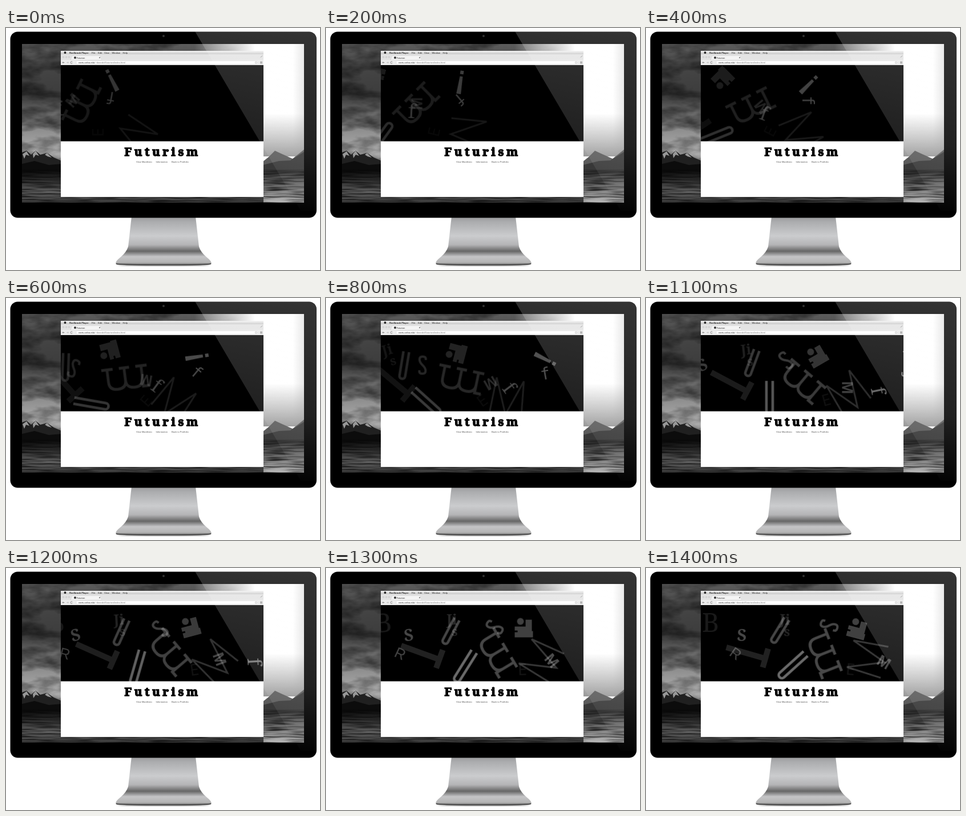
These frames come from a looping animation (550x424 px, 1.5 s). An HTML page:

```html
<!DOCTYPE html>
<html lang="en">
<head>
<meta charset="utf-8">
<title>Futurism</title>
<style>
  html, body { margin: 0; width: 100%; height: 100%; overflow: hidden; background: #fff; }
  svg { display: block; width: 100vw; height: 100vh; }
  text { font-family: "Liberation Sans", sans-serif; }
  .ui { font-size: 4.1px; }
  .title { font: 900 20.5px "Noto Serif", serif; letter-spacing: 4.6px; stroke: #000; stroke-width: 1.4; }
  .serif { font-family: "Noto Serif", serif; }
  .mono { font-family: "DejaVu Sans Mono", monospace; }
  .letters { animation: reveal 1.5s steps(8) infinite; animation-timing-function: linear; }
  .letters > g { fill: #fff; stroke: none; text-anchor: middle; animation: drift 1.5s steps(15) infinite; }
  .letters > .line { fill: none; stroke: #fff; }
  @keyframes drift {
    from { transform: var(--from); }
    to { transform: var(--to); }
  }
  /* one keyframe per third of the loop, held in 100 ms steps */
  @keyframes reveal {
    from { opacity: .35; animation-timing-function: steps(8); }
    53.333% { opacity: .55; animation-timing-function: steps(5); }
    86.667%, to { opacity: 1; }
  }
</style>
</head>
<body>
<svg viewBox="0 0 550 424" preserveAspectRatio="none">
  <defs>
    <linearGradient id="sky" x2="0" y2="1">
      <stop offset="0" stop-color="#5c5c5c"/>
      <stop offset=".2" stop-color="#444"/>
      <stop offset=".42" stop-color="#3c3c3c"/>
      <stop offset=".6" stop-color="#808080"/>
      <stop offset=".8" stop-color="#a4a4a4"/>
      <stop offset="1" stop-color="#b8b8b8"/>
    </linearGradient>
    <linearGradient id="glow">
      <stop offset="0" stop-color="#fff" stop-opacity="0"/>
      <stop offset=".55" stop-color="#fff"/>
      <stop offset=".9" stop-color="#fff"/>
      <stop offset="1" stop-color="#e4e4e4"/>
    </linearGradient>
    <linearGradient id="haze" x2="0" y2="1">
      <stop offset="0" stop-color="#999" stop-opacity="0"/>
      <stop offset="1" stop-color="#999"/>
    </linearGradient>
    <linearGradient id="water" x2="0" y2="1">
      <stop offset="0" stop-color="#080808"/>
      <stop offset=".3" stop-color="#2a2a2a"/>
      <stop offset=".7" stop-color="#606060"/>
      <stop offset="1" stop-color="#383838"/>
    </linearGradient>
    <linearGradient id="shine" x2="0" y2="1">
      <stop offset="0" stop-color="#2c2c2c"/>
      <stop offset=".5" stop-color="#777"/>
      <stop offset="1" stop-color="#b8b8b8"/>
    </linearGradient>
    <linearGradient id="metal" x2="0" y2="1">
      <stop offset="0" stop-color="#999a9c"/>
      <stop offset=".12" stop-color="#acadaf"/>
      <stop offset=".4" stop-color="#cbccce"/>
      <stop offset=".58" stop-color="#b4b4b6"/>
      <stop offset=".71" stop-color="#666"/>
      <stop offset=".82" stop-color="#c4c4c6"/>
      <stop offset=".94" stop-color="#b4b4b4"/>
      <stop offset="1" stop-color="#555"/>
    </linearGradient>
    <linearGradient id="gloss" x1=".8" y1="0" x2=".65" y2="1">
      <stop offset="0" stop-color="#fff" stop-opacity=".2"/>
      <stop offset=".6" stop-color="#fff" stop-opacity=".13"/>
      <stop offset="1" stop-color="#fff" stop-opacity="0"/>
    </linearGradient>
    <linearGradient id="bar" x2="0" y2="1">
      <stop offset="0" stop-color="#f4f4f4"/>
      <stop offset="1" stop-color="#c4c4c4"/>
    </linearGradient>
    <filter id="clouds" x="0" y="0" width="1" height="1">
      <feTurbulence type="fractalNoise" baseFrequency=".016 .04" numOctaves="4" seed="8"/>
      <feColorMatrix values="0 0 0 0 0  0 0 0 0 0  0 0 0 0 0  2.6 0 0 0 -.95"/>
    </filter>
    <filter id="ripples" x="0" y="0" width="1" height="1">
      <feTurbulence type="fractalNoise" baseFrequency=".02 .4" numOctaves="2" seed="3"/>
      <feColorMatrix values="0 0 0 0 0  0 0 0 0 0  0 0 0 0 0  2.4 0 0 0 -.9"/>
    </filter>
    <filter id="soft"><feGaussianBlur stdDeviation="1"/></filter>
    <clipPath id="screen"><rect x="28" y="28" width="494" height="278"/></clipPath>
    <clipPath id="hero"><rect x="96" y="65" width="355" height="133.500"/></clipPath>
    <clipPath id="case"><rect x="7.500" y="6.500" width="536.500" height="326" rx="13"/></clipPath>
  </defs>

  <rect width="550" height="424" fill="#fff"/>

  <!-- stand -->
  <ellipse cx="276" cy="415.500" rx="80" ry="1.800" fill="#999" filter="url(#soft)"/>
  <path fill="url(#metal)" d="M220 330H332L338 383Q341 393 352 402Q362 410 359 414Q354 416 276 416Q198 416 193 414Q190 410 200 402Q211 393 214 383Z"/>
  <path d="M193 413Q199 415 276 415Q353 415 359 413" fill="none" stroke="#444" stroke-width="1.4"/>

  <!-- display -->
  <rect x="7.500" y="6.500" width="536.500" height="326" rx="13" fill="#000"/>
  <circle cx="276" cy="14" r="2" fill="#333"/>

  <!-- wallpaper -->
  <g clip-path="url(#screen)">
    <rect x="28" y="28" width="494" height="222" fill="url(#sky)"/>
    <rect x="28" y="28" width="494" height="222" filter="url(#clouds)" opacity=".55"/>
    <rect x="330" y="28" width="192" height="222" fill="url(#glow)"/>
    <rect x="451" y="150" width="71" height="75" fill="url(#haze)"/>
    <path d="M28 218L36 215L44 222L52 215L60 222L72 219L84 227L98 233V252H28Z" fill="#202020"/>
    <path d="M29 221L36 216L41 224L35 222L32 229ZM47 221L52 215L58 224L52 222L48 228ZM68 222L72 219L80 227L73 225Z" fill="#999"/>
    <path d="M28 238L50 233L75 240L98 238V252H28Z" fill="#0c0c0c"/>
    <path d="M450 234L460 226L471 215L484 221L502 229L522 213V250H450Z" fill="#5a5a5a"/>
    <path d="M450 240L478 233L498 232L522 217V250H450Z" fill="#383838"/>
    <rect x="28" y="248" width="424" height="58" fill="url(#water)"/>
    <rect x="451" y="248" width="71" height="58" fill="url(#shine)"/>
    <rect x="28" y="250" width="494" height="56" filter="url(#ripples)" opacity=".7"/>
  </g>

  <!-- browser -->
  <rect x="96" y="40" width="355" height="256" fill="#fff"/>
  <rect x="96" y="40" width="355" height="6.500" fill="url(#bar)"/>
  <rect x="96" y="46.500" width="355" height="9.500" fill="#e3e3e3"/>
  <rect x="96" y="56" width="355" height="9" fill="#ececec"/>
  <path d="M113 56L116 48.500H164L168 56Z" fill="#f4f4f4" stroke="#ccc" stroke-width=".5"/>
  <rect x="123" y="57.500" width="318" height="6" rx="1" fill="#fff" stroke="#ccc" stroke-width=".5"/>
  <circle cx="103.500" cy="43.200" r="1.900" fill="#222"/>
  <circle cx="121" cy="52" r="2" fill="#333"/>
  <g fill="#d8d8d8" stroke="#bbb" stroke-width=".4">
    <circle cx="100.500" cy="51" r="1.400"/><circle cx="105.500" cy="51" r="1.400"/><circle cx="110.500" cy="51" r="1.400"/>
  </g>
  <g fill="none" stroke="#777" stroke-width=".8">
    <path d="M102.500 60.500H99M100.500 59L99 60.500L100.500 62M163 51L165 53M165 51L163 53"/>
    <path d="M106 60.500H109.500M108 59L109.500 60.500L108 62" stroke="#bbb"/>
    <path d="M116.300 59.500A1.800 1.800 0 1 0 116.300 61.500M446 51.500L449 48.500M445 59H449M445 60.500H449M445 62H449"/>
    <circle cx="438" cy="60.500" r="1.600" stroke="#aaa"/>
  </g>
  <g class="ui" fill="#222">
    <text x="111" y="44.700" font-weight="700">Reelbrook Player</text>
    <text x="150" y="44.700">File</text>
    <text x="161" y="44.700">Edit</text>
    <text x="172" y="44.700">View</text>
    <text x="185.500" y="44.700">Window</text>
    <text x="204.500" y="44.700">Help</text>
    <text x="124" y="53.500" font-size="3.700">Futurism</text>
    <text x="127" y="62">earts.usfca.edu<tspan fill="#777">/~tbrandel/futurism/index.html</tspan></text>
  </g>

  <!-- drifting letters -->
  <rect x="96" y="65" width="355" height="133.500" fill="#000"/>
  <g clip-path="url(#hero)">
    <g class="letters">
      <g opacity=".1" style="--from:translate(-69px,100px) rotate(-70deg);--to:translate(126px,96px) rotate(5deg)">
        <text class="serif" y="16" font-size="46">B</text>
      </g>
      <g opacity=".08" style="--from:translate(162px,183px) rotate(-90deg);--to:translate(372px,178px) rotate(12deg)">
        <text class="mono" y="9" font-size="26">E</text>
      </g>
      <g opacity=".13" style="--from:translate(40px,143px) rotate(72deg);--to:translate(187px,150px) rotate(12deg)">
        <path d="M-38 -5H38V5H-38ZM28 -18H38V16H28Z"/>
      </g>
      <g opacity=".15" style="--from:translate(-70px,98px) rotate(-39deg);--to:translate(265px,97px) rotate(6deg)">
        <text class="serif" y="2" font-size="25" font-weight="700">Ji</text>
        <text class="serif" x="5" y="22" font-size="22" font-weight="700">s</text>
      </g>
      <g class="line" opacity=".27" stroke-width="4.500" style="--from:translate(7px,130px) rotate(-20deg);--to:translate(250px,109px) rotate(35deg)">
        <path d="M-5 -25V18A5 5 0 0 0 5 18V-25"/>
      </g>
      <g class="line" opacity=".42" stroke-width="4.500" style="--from:translate(69px,196px) rotate(-176deg);--to:translate(270px,169px) rotate(64deg)">
        <path d="M-5.500 -31V25A5.500 5.500 0 0 0 5.500 25V-31"/>
      </g>
      <g class="line" opacity=".22" stroke-width="3" style="--from:translate(228px,192px) rotate(120deg);--to:translate(398px,155px) rotate(-90deg)">
        <path d="M-28 32L-24 -30L0 32L24 -30L28 32"/>
      </g>
      <g class="line" opacity=".28" stroke-width="4.800" style="--from:translate(132px,133px) rotate(116deg);--to:translate(324px,151px) rotate(258deg)">
        <path d="M-41 -18H-30V18M-30 -4Q-30 -18 -15 -18Q0 -18 0 -4V18M0 -4Q0 -18 15 -18Q30 -18 30 -4V18M-40 18H-20M-9 18H9M20 18H40"/>
      </g>
      <g opacity=".25" style="--from:translate(38px,82px) rotate(-195deg);--to:translate(394px,108px) rotate(30deg)">
        <circle cx="-6" cy="-11" r="6"/>
        <path d="M-16 -2H3V-14H14V6H16V17H-16V8H-11V5H-16Z"/>
      </g>
      <g class="line" opacity=".27" stroke-width="4" style="--from:translate(-33px,140px) rotate(97deg);--to:translate(346px,98px) rotate(-83deg)">
        <path d="M5.500 -9V-11Q5.500 -15 0 -15Q-5.500 -15 -5.500 -10Q-5.500 -5 0 0Q5.500 5 5.500 10Q5.500 15 0 15Q-5.500 15 -5.500 11V9"/>
      </g>
      <g opacity=".28" style="--from:translate(-154px,116px) rotate(-110deg);--to:translate(191px,118px) rotate(10deg)">
        <text class="serif" y="10" font-size="29" font-weight="900">S</text>
      </g>
      <g opacity=".27" style="--from:translate(-221px,150px) rotate(-105deg);--to:translate(184px,150px) rotate(45deg)">
        <text y="9" font-size="25">R</text>
      </g>
      <g opacity=".3" style="--from:translate(117px,127px) rotate(310deg);--to:translate(438px,168px) rotate(10deg)">
        <text y="9" font-size="27" font-weight="700">M</text>
      </g>
      <g opacity=".5" style="--from:translate(93px,141px) rotate(-14deg);--to:translate(522px,170px) rotate(112deg)">
        <text class="serif" y="13" font-size="35">f</text>
      </g>
      <g opacity=".58" style="--from:translate(184px,122px) rotate(190deg);--to:translate(559px,142px) rotate(-185deg)">
        <text class="mono" y="10" font-size="28">f</text>
      </g>
      <g opacity=".58" style="--from:translate(186px,92px) rotate(-27deg);--to:translate(556px,120px) rotate(243deg)">
        <path d="M-3 -21H3V-15H-3ZM-2.500 -11H2.500L4 20H-4Z"/>
      </g>
    </g>
  </g>

  <text class="title" x="207.500" y="223.500">Futurism</text>
  <g class="ui" fill="#555">
    <text x="228" y="236">View Manifesto</text>
    <text x="262.500" y="236">Information</text>
    <text x="290" y="236">Back to Portfolio</text>
  </g>

  <!-- glass reflection -->
  <path d="M331 6H544V320H516Z" fill="url(#gloss)" clip-path="url(#case)"/>
</svg>
</body>
</html>
```
